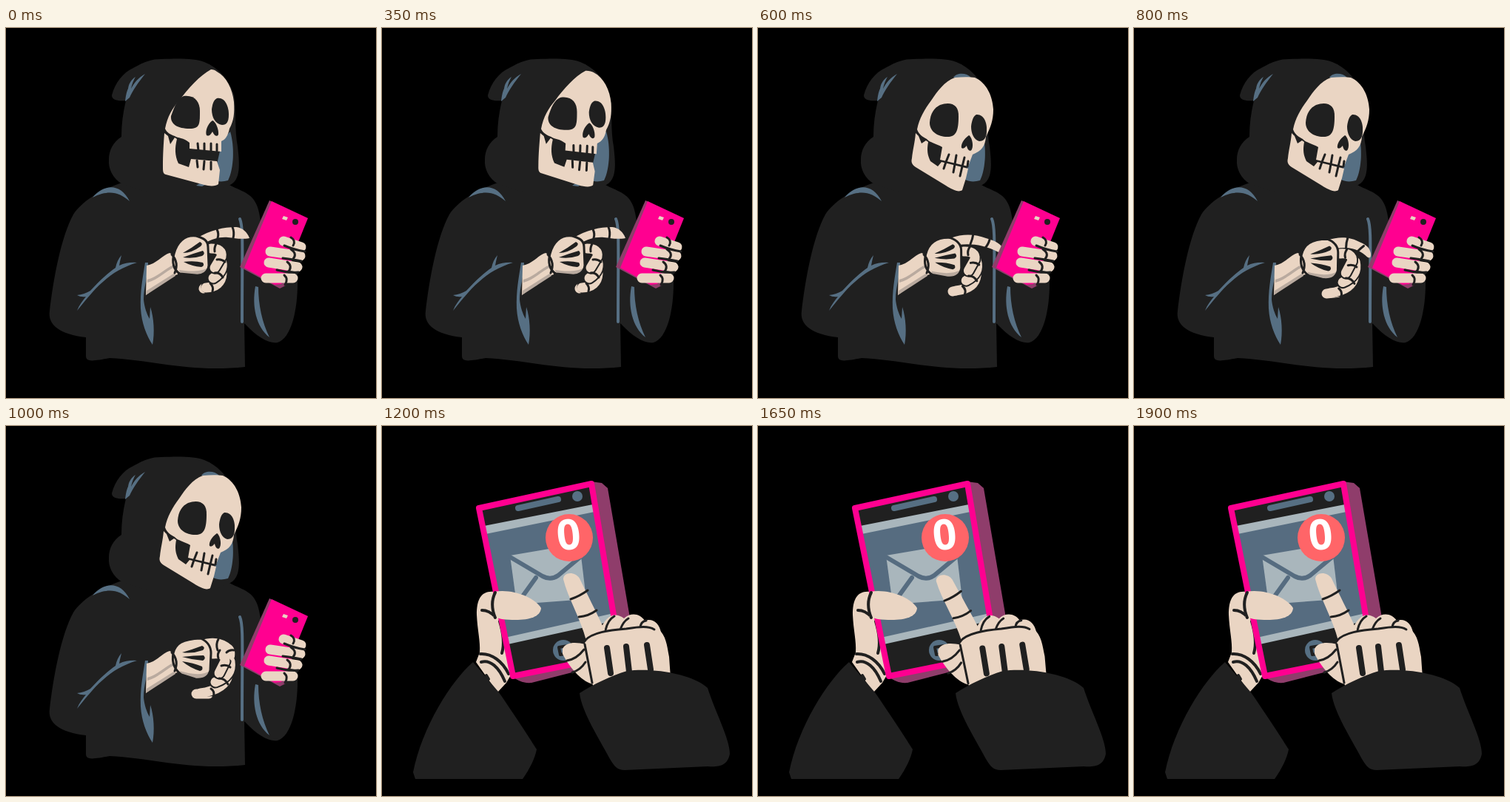
Animation of 500 by 500 pixels, one loop 2000 ms. Source, as an HTML page:

```html
<!DOCTYPE html>
<html lang="en">
<head>
<meta charset="utf-8">
<title>Reaper checking mail</title>
<style>
html, body { margin: 0; width: 100%; height: 100%; overflow: hidden; background: #000; }
svg { display: block; width: 100vw; height: 100vh; }
.robe { fill: #202020; }
.blue { fill: #566f83; }
.bone { fill: #ead5c3; }
.shade { fill: #b9aa9f; }
.pink { fill: #ff0090; }
.side { fill: #8f3d6b; }
.pale { fill: #a9b6bc; }
.line, .fold, .finger, .rim { fill: none; stroke-linecap: round; stroke-linejoin: round; }
.line { stroke: #202020; stroke-width: 3; }
.fold { stroke: #566f83; stroke-width: 4; }
.finger { stroke: #ead5c3; stroke-width: 13; }
.rim { stroke: #202020; stroke-width: 17; }
</style>
</head>
<body>
<svg viewBox="0 0 500 500" preserveAspectRatio="none">
  <g id="reading">
    <path class="robe" d="M157 209C125 220 102 235 91 252C74 283 64 340 59 382C56 402 74 414 108 418L108 443C108 452 118 450 140 446C200 449 250 466 323 458L322 399C340 418 355 427 367 425C386 419 394 380 394 345V320L350 290C342 262 345 245 334 231C326 221 312 218 300 211Z"/>
    <path class="robe" d="M162 98C150 99 143 97 143 91C147 75 158 60 172 54C188 45 197 42 210 42C235 41 255 41 268 46C288 54 301 70 308 90C311 110 309 140 313 160C316 185 317 205 303 212L280 222H190L157 211C144 203 138 190 139 178C139 165 145 154 156 147C156 130 158 115 162 98Z"/>
    <path class="blue" d="M303 140C309 160 308 190 300 206C293 208 286 208 280 205L283 160Z"/>
    <path class="blue" d="M264 67C268 60 282 60 288 67Z"/>
    <path class="blue" d="M257 213Q264 207 277 208L265 214Z"/>

    <path class="blue" d="M161 99C162 91 163 86 165 82C166 75 169 70 175 66C171 73 170 78 169 82C174 73 179 67 188 62C179 73 171 85 167 94Z"/>
    <path class="blue" d="M117 229C133 210 155 210 167 234C153 222 139 218 117 229Z"/>
    <path class="blue" d="M96 382C99 374 104 368 108 363Q101 364 96 361Q106 360 114 355C127 341 139 330 148 324Q150 314 156 307Q154 315 153 321Q164 316 177 317C158 323 144 331 131 343C117 355 107 369 96 382Z"/>
    <path class="blue" d="M188 317H192C192 335 186 350 186 367C187 377 190 386 194 393L195 377C200 392 201 412 198 428C190 416 183 398 182 379C181 356 185 336 188 317Z"/>
    <path class="fold" d="M316 258C321 269 319 300 319 397"/>
    <path class="blue" d="M337 349C332 376 338 404 356 418C346 398 341 374 341 350Z"/>

    <g id="skull"></g>
    <path class="bone" d="M190 321C203 319 211 307 221 304L230 308L232 333C217 337 205 349 189 361Z"/>
    <path class="shade" d="M191 340C203 337 214 326 226 320L228 323C215 329 206 340 191 344ZM190 355L228 331L229 335L189 361Z"/>
    <g id="hand"></g>

    <path class="side" d="M356 233L316 323L370 352L378 348L390 300L362 236Z"/>
    <path class="pink" d="M359 234L408 257L372 346L363 347L322 324Z"/>
    <path class="bone" d="M375 254L381 256L379 260L373 258Z"/>
    <circle class="robe" cx="391" cy="262" r="4"/>
    <path class="finger" d="M375 288L399 296M357 302L398 308M355 317L394 323M351 338L388 338"/>
    <path class="line" d="M385 283Q392 287 388 294M385 299Q394 305 388 312M380 316Q388 322 381 330M376 334Q382 339 377 347M376 294Q390 300 404 302M374 311Q390 313 399 315M366 327Q380 331 395 330"/>
  </g>

  <g id="mail">
    <path class="bone" d="M152 224C134 222 128 234 128 255C129 277 133 290 132 306L127 319L156 360L168 347L175 335L163 262Z"/>
    <path class="line" d="M135 249Q145 249 153 258M133 308C148 307 163 318 171 335M134 319C146 315 158 326 166 345M141 337L144 342M159 264Q167 290 162 307" style="stroke-width:4"/>
    <path class="side" d="M282 75L297 77L305 84L336 265L300 322L202 347C190 348 180 343 176 337Z"/>
    <path class="robe" d="M131 111L283 78L322 309L177 338Z"/>
    <path fill="#566c80" d="M140 140L288 109L316 261L169 289Z"/>
    <path class="pale" d="M138 135L285 106L287 116L140 146ZM166 286L313 253L315 263L170 295Z"/>
    <path class="fold" d="M184 111L238 99" style="stroke-width:8"/>
    <circle class="blue" cx="264" cy="95" r="7"/>
    <circle class="blue" cx="245" cy="303" r="14"/>
    <path class="line" d="M239 299L251 297L253 307L241 309Z" style="stroke-width:4"/>
    <path class="pale" d="M173 175L267 159L276 234L182 241Z"/>
    <path class="fold" d="M173 177L217 203Q228 209 238 202L268 177M208 205L185 237" style="stroke:#566c80;stroke-width:6"/>
    <path d="M131 111L283 78L322 309L177 338Z" fill="none" stroke="#ff0090" stroke-width="8" stroke-linejoin="round"/>
    <circle cx="253" cy="151" r="32" fill="#ff6568"/>
    <text x="252" y="167" text-anchor="middle" transform="rotate(-6 252 147)" fill="#fff" font-family="'Open Sans', sans-serif" font-weight="700" font-size="57">0</text>
    <path class="bone" d="M151 224C176 219 207 232 215 246C214 261 190 264 162 261L150 258Z"/>
    <path class="line" d="M153 225C148 235 148 247 153 259" style="stroke-width:4"/>
    <path class="robe" d="M123 319C93 345 54 407 42 468L45 477H190C200 463 207 448 209 437C195 415 176 386 158 360Z"/>

    <g id="palm">
      <path class="bone" d="M294 279C302 255 315 251 327 260C337 251 349 254 355 263C366 259 375 267 377 279L340 300Z"/>
      <path class="line" d="M302 276Q305 262 314 257M322 275Q326 264 333 260M349 272Q350 264 357 263"/>
      <path class="bone" d="M244 301C249 291 263 292 275 295L286 349C272 347 255 329 244 308Z"/>
      <path class="line" d="M250 317Q263 315 273 302M257 333Q268 330 275 319"/>
      <path id="index" class="bone" d="M245 207C245 197 261 196 267 206C278 229 288 248 301 276L276 290C268 259 251 232 245 207Z"/>
      <g id="joints"><path class="line" d="M255 234Q267 230 278 222M266 258Q279 257 290 249"/></g>
      <path class="bone" d="M274 293C284 280 306 276 330 274C351 273 363 271 373 274C384 283 385 296 388 312L391 355H286C281 331 273 312 274 293Z"/>
      <path class="line" d="M274 290C284 279 306 276 330 274C349 271 360 270 368 275M274 295L284 347"/>
      <path class="line" d="M304 300L309 334M330 298L334 332M358 296L363 329" style="stroke-width:8"/>
    </g>
    <path class="robe" d="M267 361C286 349 308 338 331 331C365 326 420 335 440 354C451 388 470 423 470 443C467 459 456 461 440 460L328 465C318 465 314 460 308 450C295 425 270 387 267 361Z"/>
  </g>
</svg>
<script>
const $ = id => document.getElementById(id);
const clamp = v => Math.max(0, Math.min(1, v));

// Blend two paths that share one structure.
function mix(a, b, u) {
  const ends = b.match(/[\d.]+/g);
  let i = 0;
  return a.replace(/[\d.]+/g, n => (+n + (ends[i++] - n) * u).toFixed(2));
}

function pose(keys, u) {
  if (keys.length === 2) return mix(keys[0], keys[1], u);
  return u < .4 ? mix(keys[0], keys[1], u / .4) : mix(keys[1], keys[2], (u - .4) / .6);
}

function build(parent, list) {
  return list.map(([kind, ...keys]) => {
    const el = document.createElementNS('http://www.w3.org/2000/svg', 'path');
    el.setAttribute('class', kind);
    $(parent).append(el);
    return u => el.setAttribute('d', pose(keys, u));
  });
}

const skull = build('skull', [
  ['robe',
    'M229 147L290 162L285 184L247 189L233 185Z',
    'M228 150L285 180L281 195L243 188L232 181Z'],
  ['bone',
    'M214 142L219 146L222 157L228 148L231 150C228 162 228 172 233 183L247 188L250 177L285 180L289 192L287 211C284 214 275 214 268 212L216 198C212 197 212 193 212 188C212 170 213 155 214 142Z',
    'M213 142L217 146L221 156L227 152L230 154C228 165 229 172 233 180L243 187L248 181L284 190L281 203L276 219C271 223 262 218 254 213L213 188C207 184 207 180 208 176C209 165 212 155 213 142Z'],
  ['bone',
    'M277 56C280 56 283 57 285 59C298 66 306 82 308 100C309 115 308 125 302 136C300 146 296 151 291 153L291 167L248 163L248 155C240 148 232 149 228 146C222 144 217 141 215 136C218 120 225 108 234 98C246 82 262 64 277 56Z',
    'M266 67C276 66 287 66 293 67C309 74 317 92 318 110C318 125 314 135 308 147C307 160 302 166 290 171L284 187L246 178L249 161C241 156 232 155 228 150C222 147 217 143 215 137C218 122 225 110 234 98C242 86 252 72 266 67Z'],
  ['robe',
    'M240 92C255 90 262 100 262 112C262 130 262 136 248 136C232 136 222 130 223 119C228 105 232 95 240 92Z',
    'M246 104C260 99 272 103 271 120C271 138 268 146 258 147C245 148 232 141 232 128C233 115 238 108 246 104Z'],
  ['robe',
    'M285 95C296 93 301 106 301 117C301 127 298 131 292 131C283 130 278 121 278 110C279 102 281 97 285 95Z',
    'M295 117C305 116 310 128 309 139C309 149 305 153 299 153C292 151 288 143 288 133C289 125 291 119 295 117Z'],
  ['robe',
    'M279 125C272 130 269 140 271 145C275 147 277 143 279 140C281 145 285 148 287 144C288 137 283 126 279 125Z',
    'M285 145C278 150 274 157 275 162C278 164 280 161 282 159C283 165 287 168 289 164C292 157 288 146 285 145Z'],
  ['line',
    'M259 156L260 166M268 156L268 167M277 156L277 167M285 157L285 166M258 179L259 188M268 180L267 191M277 181L277 191',
    'M258 171L254 181M268 172L266 184M279 175L276 187M284 180L283 187M254 181L251 190M266 184L264 195M276 187L273 200']
]);

const hand = build('hand', [
  ['finger',
    'M267 352L277 347',
    'M257 362L274 362'],
  ['rim',
    'M272 350Q291 350 292 332',
    'M272 357Q298 356 300 337'],
  ['finger',
    'M270 351Q291 350 292 332',
    'M263 361Q296 356 300 337'],
  ['rim',
    'M280 338Q297 327 290 311',
    'M283 346Q306 338 303 318'],
  ['finger',
    'M280 338Q297 327 290 311',
    'M283 346Q306 338 303 318'],
  ['rim',
    'M277 298Q293 298 291 309L282 324',
    'M279 308Q297 306 296 318L288 334'],
  ['finger',
    'M277 298Q293 298 291 309L282 324',
    'M279 308Q297 306 296 318L288 334'],
  ['bone',
    'M258 284C276 273 294 269 311 269C320 270 326 276 329 284C317 286 310 284 300 283C287 282 278 286 270 290Z',
    'M260 284C278 277 295 279 308 284C322 288 328 292 331 298C335 304 331 306 325 303C306 293 288 291 271 293Z',
    'M262 290C279 284 293 287 303 295C309 299 310 305 309 312C306 320 303 317 301 312C295 300 284 301 275 303Z'],
  ['line',
    'M285 272Q288 278 286 284M306 269Q309 276 307 284',
    'M291 278Q290 285 287 292M313 286Q311 293 307 297',
    'M287 288Q283 295 286 303M308 303Q302 302 298 306'],
  ['line',
    'M285 313Q291 312 296 316M282 331Q289 330 293 337M276 345Q281 350 279 356M285 290Q281 296 282 302',
    'M291 324Q298 322 303 326M288 341Q296 341 300 349M277 355Q283 359 280 366M289 303Q285 308 287 314'],
  ['bone',
    'M227 305C231 290 241 279 257 281C267 284 273 287 273 296L274 321C273 330 266 335 256 334L235 332C226 327 224 316 227 305Z',
    'M226 307C229 294 238 288 263 287C272 291 277 298 277 307L276 330C274 339 267 343 256 342L237 336C226 328 224 318 226 307Z'],
  ['shade',
    'M234 327C246 329 262 330 273 324C270 335 261 336 252 334L236 333Z',
    'M235 331C248 335 265 338 275 331C272 342 264 344 254 342L237 337Z'],
  ['line',
    'M227 305C231 290 241 279 257 281C267 284 273 287 273 296L274 321C273 330 266 335 256 334L235 332C226 327 224 316 227 305M224 306Q234 317 228 331',
    'M226 307C229 294 238 288 263 287C272 291 277 298 277 307L276 330C274 339 267 343 256 342L237 336C226 328 224 318 226 307M224 306Q234 317 228 331'],
  ['robe',
    'M239 304Q250 298 262 289Q267 291 263 295Q251 304 239 304ZM239 310Q252 305 266 301Q270 305 265 308Q253 312 239 310ZM240 316Q254 314 266 317Q269 321 264 323Q251 322 240 316Z',
    'M238 306Q252 302 265 297Q270 299 266 303Q252 308 238 306ZM238 312Q254 310 267 310Q271 314 266 317Q252 316 238 312ZM238 318Q253 320 265 325Q267 330 262 331Q249 327 238 318Z']
]);

function draw(ms) {
  const t = Math.floor(ms % 2000 / 50) * 50;
  const reading = t < 1200;
  $('reading').style.display = reading ? '' : 'none';
  $('mail').style.display = reading ? 'none' : '';
  if (reading) {
    const nod = clamp((t - 300) / 300);
    const curl = t < 600 ? .4 * clamp((t - 400) / 200) : .4 + .6 * clamp((t - 600) / 400);
    skull.forEach(set => set(nod));
    hand.forEach(set => set(curl));
  } else {
    // Two taps, each a 300 ms swing out and back.
    const phase = t > 1300 && t < 1900 ? (t - 1300) % 300 / 150 : 0;
    const swing = 1 - Math.abs(1 - phase);
    $('palm').setAttribute('transform', `rotate(${-2.6 * swing} 335 345)`);
    for (const id of ['index', 'joints'])
      $(id).setAttribute('transform', `rotate(${-5 * swing} 288 282)`);
  }
}

const start = performance.now();
function tick() {
  draw(performance.now() - start);
  requestAnimationFrame(tick);
}
draw(0);
requestAnimationFrame(tick);
</script>
</body>
</html>
```
